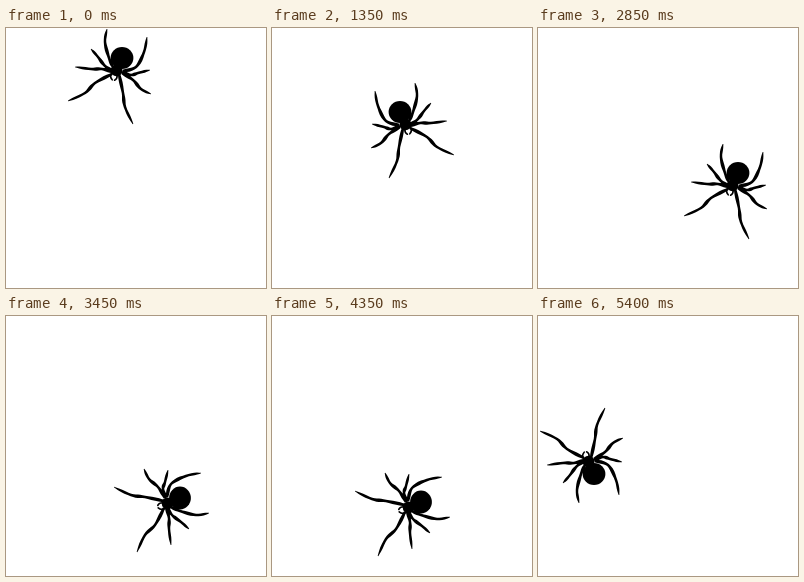
These frames come from a looping animation (260x260 px, 8000 ms). An HTML page:

```html
<!DOCTYPE html>
<html lang="en">
<head>
<meta charset="utf-8">
<title>Crawling spider</title>
<style>
  html, body { margin: 0; width: 100%; height: 100%; overflow: hidden; background: #fff; }
  svg { display: block; width: 100%; height: 100%; }
</style>
</head>
<body>
<svg viewBox="0 0 260 260">
  <g id="spider">
    <ellipse rx="11.4" ry="10.9"/>
    <ellipse cx="-5.5" cy="12.5" rx="6" ry="5.8"/>
    <path id="legs"/>
    <path d="M-10.5 15Q-12.5 19-9.8 21.8M-4.8 17Q-4.6 21-7.4 22.2" fill="none" stroke="#000" stroke-width="1.6" stroke-linecap="round"/>
  </g>
</svg>
<script>
const LOOP = 8000, STEP = 150, RESUME = 1350, LAST = 30;

// Each leg runs from tip to body; the abdomen is the origin.
const LEGS = [
  [-15, -29, -17, -16, -13, 0, -9, 9],
  [-31, -9, -24, -1, -17, 8, -9, 13],
  [-47, 9, -31, 11, -20, 11, -9, 14],
  [-54, 43, -37, 35, -27, 25, -10, 16],
  [11, 66, 3, 49, 1, 35, -3, 16],
  [29, 36, 19, 31, 11, 22, 0, 15],
  [28, 12, 16, 15, 9, 17, 0, 14],
  [25, -21, 22, -6, 14, 9, 1, 13]
];

const POSES = {
  down: '1 0 0 1', downRight: '-1 0 0 1', right: '0 -1 1 0',
  left: '0 -1 -1 0', upLeft: '0 1 -1 0', up: '1 0 0 -1'
};
const TURNS = [[0, 'down'], [3, 'downRight'], [5, 'right'], [9, 'downRight'],
  [12, 'down'], [15, 'left'], [26, 'upLeft'], [28, 'up']];

// step, x, y
const ROUTE = [[0, 116, 30], [2, 116, 51], [3, 128, 84], [8, 176, 93], [9, 200, 117],
  [11, 203, 131], [13, 200, 145], [16, 190, 179], [17, 174, 182], [21, 120, 191],
  [23, 149, 186], [25, 120, 191], [27, 85, 178], [30, 56, 158]];

function spline(a, b, c, d, u) {
  return b + u * (c - a + u * (2 * a - 5 * b + 4 * c - d + u * (3 * (b - c) + d - a))) / 2;
}

function legPath(p) {
  const at = (s, axis) => {
    const i = Math.min(2, Math.floor(s));
    const v = k => p[2 * Math.max(0, Math.min(3, k)) + axis];
    return spline(v(i - 1), v(i), v(i + 1), v(i + 2), s - i);
  };
  const one = [], two = [];
  for (let k = 0; k <= 18; k++) {
    const s = k / 6, e = 0.02;
    const lo = Math.max(0, s - e), hi = Math.min(3, s + e);
    const dx = at(hi, 0) - at(lo, 0), dy = at(hi, 1) - at(lo, 1);
    const half = (0.6 + 0.9 * Math.min(1, s) - 0.25 * Math.cos(s * Math.PI * 2)) / Math.hypot(dx, dy);
    const x = at(s, 0), y = at(s, 1);
    one.push([x - dy * half, y + dx * half]);
    two.unshift([x + dy * half, y - dx * half]);
  }
  return 'M' + one.concat(two).map(q => q.map(n => n.toFixed(2)).join(' ')).join('L') + 'Z';
}

function stepAt(t) {
  if (t < RESUME) return Math.min(2, Math.floor(t / STEP));
  return Math.min(LAST, 3 + Math.floor((t - RESUME) / STEP));
}

function place(n) {
  const i = Math.max(1, ROUTE.findIndex(k => k[0] >= n));
  const [n0, x0, y0] = ROUTE[i - 1], [n1, x1, y1] = ROUTE[i];
  const u = (n - n0) / (n1 - n0);
  return [x0 + (x1 - x0) * u, y0 + (y1 - y0) * u];
}

const spider = document.getElementById('spider');
document.getElementById('legs').setAttribute('d', LEGS.map(legPath).join(''));

function draw(t) {
  const n = stepAt(t);
  const pose = TURNS.filter(k => k[0] <= n).pop()[1];
  spider.setAttribute('transform', `matrix(${POSES[pose]} ${place(n).join(' ')})`);
}

const start = performance.now();
function tick() {
  draw((performance.now() - start) % LOOP);
  requestAnimationFrame(tick);
}
tick();
</script>
</body>
</html>
```
